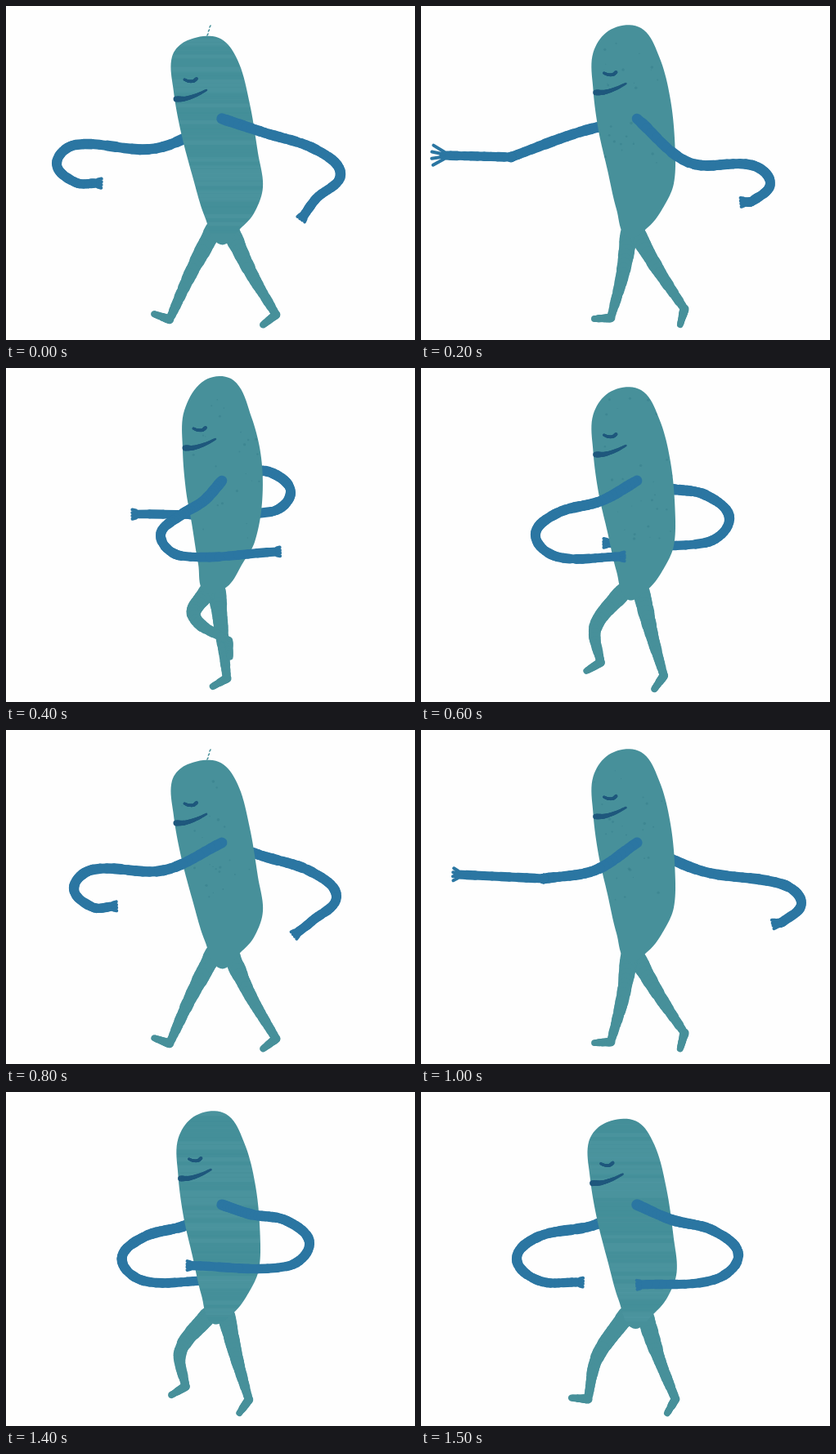
Animation, 500 px wide and 409 px high, one loop 1600 ms. Source, as an HTML page with a canvas:

```html
<!DOCTYPE html>
<html lang="en">
<head>
<meta charset="utf-8">
<title>Walking figure</title>
<style>
  html, body { margin: 0; width: 100%; height: 100%; overflow: hidden; background: #fefefe; }
  canvas { display: block; width: 500px; height: 409px; }
</style>
</head>
<body>
<canvas id="stage" width="500" height="409"></canvas>
<script>
const ctx = document.getElementById('stage').getContext('2d');
const STEPS = 16, STEP_MS = 100, HALF = STEPS / 2;
const TEAL = '#47909a', BLUE = '#2b76a2', INK = '#1f587d', PAPER = '#fefefe';
const SHOULDER = [264, 138];

// The walk is keyed at these steps; the two sides move half a cycle apart.
const KEYS = [0, 2, 4, 7, 8, 10, 12, 15];

// Elbow bend x, y, radius (negative bends left); upper arm sag; hand x, y.
const elbowBack = [358, 200, 30, 4, 268, 236];
const elbowFront = [144, 204, -27, 8, 194, 233];
const handBehind = [214, 205, -25, 6, 331, 225];
const farArm = [
  [85, 193, -23, 22, 112, 217],
  [110, 185, 0, -5, 28, 183],
  [324, 152, 24, -5, 159, 179],
  elbowBack,
  [374, 204, 30, 0, 355, 249],
  [442, 212, 23, 12, 434, 237],
  handBehind,
  elbowFront
];
const nearArm = [
  [106, 194, -23, 19, 131, 216],
  [150, 182, 0, 14, 45, 177],
  [309, 159, 17, 0, 157, 179],
  elbowFront.with ? null : null
].slice(0, 3).concat([
  elbowBack,
  [379, 206, 30, 0, 363, 258],
  [405, 217, 22, 28, 395, 240],
  handBehind,
  elbowFront
]);

// Ankle x, y; how far the knee bends forward; foot pitch in degrees.
const legs = [
  [200, 384, 2, -20],
  [232, 382, -3, 3],
  [270, 380, 0, 30],
  [311, 376, 2, 60],
  [330, 378, 3, 38],
  [322, 371, 2, 75],
  [272, 334, 29, 95],
  [204, 376, 12, -4]
];

// Body outline, clockwise from the crown, at full stride and upright.
const stride = [222,42, 260,39, 283,66, 298,120, 308,180, 314,222, 303,254,
  287,272, 262,292, 243,258, 229,212, 214,155, 205,105, 203,62];
const upright = [243,15, 278,15, 300,60, 312,110, 313,165, 304,213, 290,238,
  270,268, 243,275, 235,240, 227,190, 220,150, 216,100, 218,52];

const lerp = (a, b, u) => a.map((v, c) => v + (b[c] - v) * u);
const pairs = flat => flat.flatMap((v, i) => i % 2 ? [] : [[v, flat[i + 1]]]);
const lift = step => Math.sin(Math.PI * step / HALF) ** 2;

function random(seed) {
  return () => (seed = (seed * 16807 + 11) % 2147483647) / 2147483647;
}

// Monotone cubic through the keyed rows, wrapping round the loop.
function pose(rows, step) {
  const n = KEYS.length;
  const i = KEYS.findLastIndex(k => k <= step);
  const row = j => rows[(j + n) % n];
  const key = j => KEYS[(j + n) % n] + STEPS * Math.floor(j / n);
  const slope = (j, c) => (row(j + 1)[c] - row(j)[c]) / (key(j + 1) - key(j));
  const tangent = (j, c) => {
    const a = slope(j - 1, c), b = slope(j, c);
    return a * b > 0 ? 2 * a * b / (a + b) : 0;
  };
  const span = key(i + 1) - key(i), u = (step - key(i)) / span;
  return lerp(row(i), row(i + 1), u * u * (3 - 2 * u)).map((v, c) =>
    v + span * u * (1 - u) * ((1 - u) * tangent(i, c) - u * tangent(i + 1, c)));
}

// Point on a smooth curve from b to c, with neighbours a and d.
function curve(a, b, c, d, u) {
  const length = Math.hypot(c[0] - b[0], c[1] - b[1]);
  const tangent = (p, q, i) => (q[i] - p[i]) * length / (Math.hypot(q[0] - p[0], q[1] - p[1]) || 1);
  return lerp(b, c, u * u * (3 - 2 * u)).map((v, i) =>
    v + u * (1 - u) * ((1 - u) * tangent(a, c, i) - u * tangent(b, d, i)));
}

function line(points, color, width) {
  ctx.strokeStyle = color;
  ctx.lineWidth = width;
  ctx.beginPath();
  points.forEach(p => ctx.lineTo(...p));
  ctx.stroke();
}

// Slightly uneven stroke that tapers between two widths.
function brush(points, from, to, color, rnd) {
  const last = points.length - 1;
  const at = i => points[Math.max(0, Math.min(last, i))];
  let prev = points[0];
  for (let k = 1; k <= last * 10; k++) {
    const i = Math.floor((k - 1) / 10);
    const next = curve(at(i - 1), at(i), at(i + 1), at(i + 2), k / 10 - i);
    const width = from + (to - from) * k / (last * 10);
    line([prev, next], color, width * (.96 + .1 * rnd()));
    prev = next;
  }
}

function arm(track, step, reach, rnd) {
  const [x, y, bend, sag, hx, hy] = pose(track, step);
  const r = Math.abs(bend), top = [x, y - r], low = [x, y + r], hand = [hx, hy];
  const upper = lerp(SHOULDER, top, .45);
  upper[1] += sag;
  brush([SHOULDER, upper, top, [x + bend, y], low, hand], 13, 11, BLUE, rnd);

  // Fingers open as the arm stretches forward.
  const open = Math.max(0, Math.cos(Math.PI * (step - 2) / HALF)) ** 8;
  const angle = Math.atan2(hy - low[1], hx - low[0]);
  const length = 4 + reach * open;
  for (let k = -1.5; k <= 1.5; k++) {
    const a = angle + k * (.15 + .2 * open);
    const p = [hx - 3 * k * Math.sin(angle), hy + 3 * k * Math.cos(angle)];
    line([p, [p[0] + length * Math.cos(a), p[1] + length * Math.sin(a)]], BLUE, 4);
  }
}

function leg(step, rnd) {
  const [x, y, bend, pitch] = pose(legs, step);
  const turn = Math.PI * step / HALF, a = pitch * Math.PI / 180;
  const hip = [264 - 10 * Math.cos(turn) + 6 * Math.sin(turn) - 12 * lift(step), 274];
  const ankle = [x, y], knee = lerp(hip, ankle, .5);
  knee[0] -= bend;
  brush([hip, knee, ankle], 22, 10, TEAL, rnd);
  brush([ankle, [x - 20 * Math.cos(a), y + 20 * Math.sin(a)]], 11, 8, TEAL, rnd);
}

function body(step, rnd) {
  const p = pairs(lerp(stride, upright, lift(step)));
  const at = i => p[(i + p.length) % p.length];
  ctx.beginPath();
  for (let k = 0; k < p.length * 10; k++) {
    const i = Math.floor(k / 10);
    ctx.lineTo(...curve(at(i - 1), at(i), at(i + 1), at(i + 2), k / 10 - i));
  }
  ctx.fillStyle = TEAL;
  ctx.fill();
  ctx.save();
  ctx.clip();
  if ((step + 4) % STEPS < 5) washes(rnd);
  else speckles(rnd);
  ctx.restore();
}

function washes(rnd) {
  for (let y = 10; y < 280; y += 5) {
    ctx.fillStyle = rnd() < .5 ? 'rgba(120,190,195,.06)' : 'rgba(30,110,130,.05)';
    ctx.fillRect(195, y, 130, 3 + 4 * rnd());
  }
}

function speckles(rnd) {
  ctx.fillStyle = 'rgba(35,100,120,.22)';
  for (let i = 0; i < 34; i++) {
    ctx.beginPath();
    ctx.arc(205 + 105 * rnd(), 20 + 190 * rnd(), .5 + 1.3 * rnd(), 0, 7);
    ctx.fill();
  }
}

function face(step, rnd) {
  const [x, y] = lerp([206, 114], [217, 98], lift(step));
  brush([[x + 2, y], [x + 13, y - .5], [x + 27, y - 5], [x + 39, y - 11]], 7, 2.5, INK, rnd);
  brush([[x + 12, y - 24], [x + 17, y - 22], [x + 23, y - 22], [x + 27, y - 25]], 3, 4, INK, rnd);
}

function hair() {
  for (let k = 0; k < 3; k++)
    line([[246 + 1.5 * k, 36 - 5 * k], [247 + 1.5 * k, 34 - 5 * k]], TEAL, 1.6);
}

function draw(step) {
  const rnd = random(step * 971 + 17), other = (step + HALF) % STEPS;
  ctx.fillStyle = PAPER;
  ctx.fillRect(0, 0, 500, 409);
  ctx.lineCap = ctx.lineJoin = 'round';
  arm(farArm, step, 11, rnd);
  leg(step, rnd);
  leg(other, rnd);
  body(step, rnd);
  face(step, rnd);
  arm(nearArm, other, 2, rnd);
  if (step % HALF === 0) hair();
}

let shown = -1;
function tick(now) {
  const step = Math.floor(now / STEP_MS) % STEPS;
  if (step !== shown) draw(shown = step);
  requestAnimationFrame(tick);
}
draw(shown = 0);
requestAnimationFrame(tick);
</script>
</body>
</html>
```
